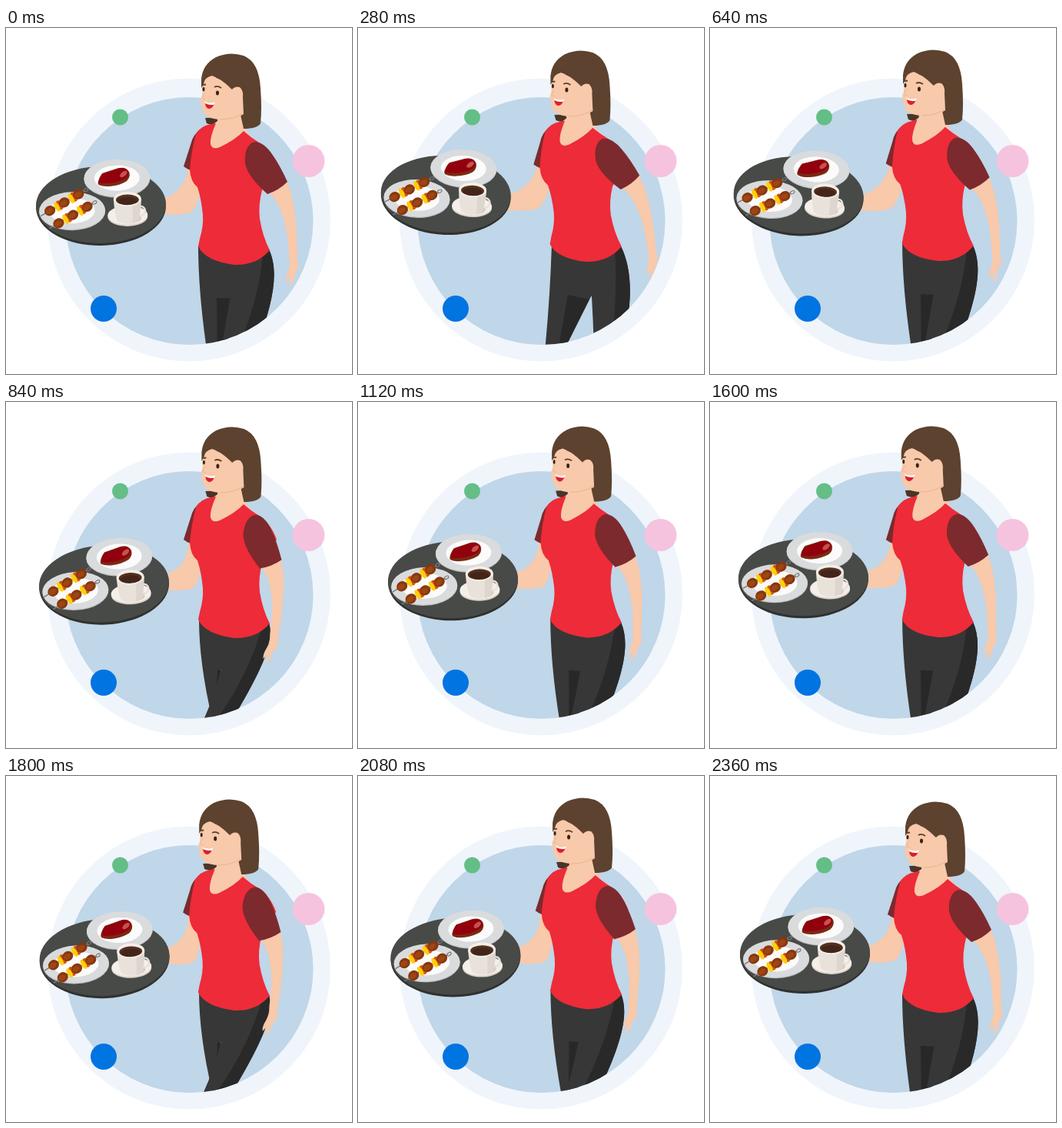
Animation of 450 by 450 pixels, one loop 2.4 s. Source, as an HTML page:

```html
<!DOCTYPE html>
<html lang="en">
<head>
<meta charset="utf-8">
<title>Waitress with tray</title>
<style>
html, body { margin: 0; width: 100%; height: 100%; overflow: hidden; background: #fff; }
svg { display: block; width: 100vw; height: 100vh; }
</style>
</head>
<body>
<svg viewBox="0 0 450 450">
  <defs>
    <clipPath id="stage"><path d="M0 0H450V251H399.5A161 161 0 0 1 77.5 251H0Z"/></clipPath>
  </defs>
  <circle cx="238" cy="249.5" r="184" fill="#eff5fb"/>
  <circle cx="238.5" cy="251" r="161" fill="#c0d6e9"/>
  <circle cx="148.5" cy="116" r="10.5" fill="#64be86"/>
  <circle cx="393.5" cy="173" r="21" fill="#f6c3df"/>
  <circle cx="127" cy="365" r="17" fill="#0074e0"/>

  <g clip-path="url(#stage)">
    <g id="backHair"><path d="M259 117L284 116L280 126Q268 127 261 124Z" fill="#4a3526"/></g>
    <path id="farArm" fill="#f8c9aa"/>
    <g id="legs">
      <path id="leftLeg" fill="#373737"/>
      <path id="shade" fill="#282828"/>
      <path id="rightLeg" fill="#373737"/>
      <path id="rightDark" fill="#292929"/>
    </g>
    <g id="torso">
      <path d="M254 131Q243 138 240 152L231 180Q239 186 250 188L262 150Z" fill="#7c2a2d"/>
      <path d="M276 112L275 121Q270 125 262 130L262 160H285L316 138Q311 133 310 126V100Z" fill="#f8c9aa"/>
      <path d="M267 125Q253 127 247 138Q241 160 239 184Q240 200 249 207Q254 222 256 243Q257 258 252 274L250 284Q259 303 297 308Q326 309 343 289Q334 272 330 248Q328 230 333 211L352 180Q344 158 329 149Q318 142 309 134Q299 145 278 155Q268 159 266 151Q265 142 273 124Q270 124 267 125Z" fill="#ee2b38"/>
      <g id="nearArm">
        <path d="M338 205L364 197Q373 216 376 243Q379 265 379 300Q381 307 380 313Q375 319 375 327Q372 335 368 336Q370 329 371 322Q367 328 365 331Q363 326 367 316Q370 308 368 298Q367 271 363 256Q356 226 342 214Z" fill="#f8c9aa"/>
        <path d="M323 148C313 151 310 163 311 176Q314 193 340 216Q355 211 366 200Q356 178 346 164Q335 148 323 148Z" fill="#7c2a2d"/>
      </g>
    </g>
    <g id="head">
      <path d="M254 66Q256 47 273 38Q291 30 309 36Q329 44 331 78Q333 105 331 124Q327 131 309 131L300 90L258 76Z" fill="#5c422f"/>
      <path d="M256 64Q265 58 274 65Q284 68 294 80Q298 75 304 77Q309 81 308 90L309 112Q297 120 282 119Q266 119 259 113Q255 107 254 100L253 92Q256 88 255 80Z" fill="#f8c9aa"/>
      <path d="M278 119Q297 119 309 110" fill="none" stroke="#e7b692" stroke-width="1"/>
      <path d="M254 67L260 58Q276 57 287 69L294 80Q279 65 268 62Q258 64 257 73L254 78Z" fill="#5c422f"/>
      <path d="M256 74L260 73.5M271 77Q275 74.5 280 78" fill="none" stroke="#5c422f" stroke-width="1.8"/>
      <ellipse cx="257" cy="79.5" rx="1.5" ry="2.8" fill="#3b2118"/>
      <ellipse cx="275" cy="84.5" rx="2" ry="3" fill="#3b2118"/>
      <path d="M259 84Q255 90 256 92L260 93" fill="none" stroke="#edb990" stroke-width="1"/>
      <path d="M258 95.500Q265 99 272 96.500Q270 102 266 103Q261 102 258 95.500Z" fill="#fff"/>
      <path d="M259 98Q265 101 270.500 99.500Q268 105 263.500 105Q259.500 103.500 259 98Z" fill="#df1d2b"/>
    </g>
  </g>

  <g id="tray">
    <ellipse cx="123.500" cy="232.500" rx="84.500" ry="50.500" fill="#30312f"/>
    <ellipse cx="123.500" cy="230" rx="84.500" ry="50" fill="#484a47"/>
    <g id="plates"></g>
    <path d="M120 202Q121 195 126 189Q136 186 146 183Q157 180 161 188Q163 195 157 200Q148 205 137 206Q127 207 121 204Z" fill="#7a2a12"/>
    <path d="M121 201Q122 194 127 189Q138 187 147 183Q158 181 160 189Q160 195 152 198Q143 202 133 202Q126 203 121 201Z" fill="#93000d"/>
    <ellipse cx="153.500" cy="190.500" rx="5.500" ry="3" fill="#c4534e" transform="rotate(-38 153.500 190.500)"/>
    <g id="skewers"></g>
    <ellipse cx="158" cy="246" rx="26" ry="12.500" fill="#d9d2c8"/>
    <ellipse cx="158" cy="244" rx="26" ry="12.500" fill="#f4efe8"/>
    <ellipse cx="160" cy="248" rx="16" ry="7" fill="#d8d0c6"/>
    <ellipse cx="175.500" cy="239" rx="5.500" ry="6" fill="none" stroke="#e8e2da" stroke-width="2.500"/>
    <path d="M140 223Q141 244 145 252Q158 259 171 252Q175 243 176 223Z" fill="#e9e2db"/>
    <path d="M165 230L176 223Q175 243 171 252Q168 254 164 255Z" fill="#ded6ce"/>
    <ellipse cx="158" cy="223" rx="18" ry="9.500" fill="#f4efe9"/>
    <ellipse cx="158" cy="224" rx="15" ry="6.800" fill="#54301f"/>
    <ellipse cx="158" cy="225.500" rx="12.500" ry="5" fill="#43251a"/>
  </g>
</svg>
<script>
const LOOP = 2400;
const $ = id => document.getElementById(id);

// Static tray items
const disc = (x, y, rx, ry, fill) => `<ellipse cx="${x}" cy="${y}" rx="${rx}" ry="${ry}" fill="${fill}"/>`;
const plate = (x, y) => disc(x, y + 1, 43, 24.5, '#bfc0c2') + disc(x, y, 43, 24.3, '#dadbdd') + disc(x, y, 29.5, 16.5, '#fbfbfb');

function skewer(x, y) {
  const bit = (d, rx, ry, fill) => disc(d, 0, rx, ry, fill);
  let s = '<path d="M-14 0H52" stroke="#77797c" stroke-width="1.4"/>' +
    '<ellipse cx="54" cy="0" rx="3" ry="1.800" fill="none" stroke="#77797c" stroke-width="1.100"/>';
  for (let i = 0; i < 3; i++) {
    const d = i * 21.5;
    if (i) s += bit(d - 7, 4.5, 6.5, '#d9540f') + bit(d - 11, 3, 6.8, '#ffcf08');
    s += bit(d, 7.3, 6.4, '#87370f') + bit(d - 1, 5, 3.5, '#9c4614');
  }
  return `<g transform="translate(${x} ${y}) rotate(-29)">${s}</g>`;
}
$('plates').innerHTML = plate(86, 237) + plate(145, 195.5);
$('skewers').innerHTML = skewer(57, 236.5) + skewer(68, 253);

// Smooth periodic track through [time, value] keys, flat at the extremes
function track(...keys) {
  const n = keys.length;
  const key = i => {
    const lap = Math.floor(i / n), k = keys[i - lap * n];
    return [k[0] + lap * LOOP, k[1]];
  };
  const slope = i => {
    const a = key(i), b = key(i + 1);
    return (b[1] - a[1]) / (b[0] - a[0]);
  };
  const tangent = i => {
    const a = slope(i - 1), b = slope(i);
    return a * b <= 0 ? 0 : 2 * a * b / (a + b);
  };
  return t => {
    let i = n - 1;
    while (i > 0 && keys[i][0] > t) i--;
    const a = key(i), b = key(i + 1), h = b[0] - a[0], u = (t - a[0]) / h;
    const v = 1 - u;
    return a[1] * (1 + 2 * u) * v * v + b[1] * u * u * (3 - 2 * u) +
      h * u * v * (tangent(i) * v - tangent(i + 1) * u);
  };
}

const trayX = track([0, 0], [280, -9.2], [470, -12.5], [640, -8.3], [840, 4], [950, 5.5], [1360, -9], [1400, -8.6], [1800, 4.6], [1880, 5.5], [2360, 0]);
const trayY = track([0, 0], [280, -14], [470, -16], [640, -12.7], [840, 6.5], [950, 8], [1360, -10], [1400, -9.5], [1800, 6], [1880, 7], [2360, 0]);
const trayTurn = track([0, -1], [280, 2.5], [470, 3.5], [640, 2.8], [840, -2.8], [950, -3.2], [1400, 1.3], [1800, -2.8], [1880, -3], [2360, -1]);
const bob = track([0, 0], [280, -4], [480, -5.6], [640, -5], [840, -1], [960, 0], [1340, -4.2], [1400, -4], [1600, -2], [1800, -3], [2000, -5.6], [2360, 0]);
const headX = track([0, 0], [280, -3.6], [480, -4.2], [640, -3], [840, 0.4], [930, 1], [1400, -7], [1800, -2.8], [2360, 0]);
const lean = track([0, 0], [280, -1.3], [480, -1.5], [640, -1.1], [840, 0], [1400, -1.5], [1800, -0.4], [2360, 0]);
const swing = track([0, 0], [280, -5], [430, -7], [640, -0.5], [840, 10], [920, 11], [1380, -7], [1400, -6.8], [1800, 10], [1880, 10.5], [2360, 0]);
const stride = track([0, 0.45], [280, 1], [400, 1.06], [640, 0.43], [840, 0], [900, -0.02], [1380, 0.86], [1400, 0.85], [1800, 0], [1860, -0.02], [2240, 0.45]);

// Leg outlines: crossed, passing, wide
const crossed = [251,283, 251,345, 271,425, 275,349, 272,425, 279,350, 285,425, 279,351, 270,388, 252,425, 288,425, 330,355, 350,315, 315,360, 266,425];
const passing = [250,283, 250,345, 262,425, 274,351, 275,425, 300,352, 285,425, 291,354, 285,388, 279,425, 322,425, 345,365, 357,320, 331,350, 298,425];
const wide = [252,284, 250,352, 243,425, 273,351, 260,425, 301,357, 267,425, 304,354, 306,388, 307,425, 340,425, 358,370, 358,320, 338,350, 329,425];

function drawLegs(s) {
  const [a, b, u] = s < 0.45 ? [crossed, passing, s / 0.45] : [passing, wide, (s - 0.45) / 0.55];
  const p = [];
  for (let i = 0; i < a.length; i += 2) {
    p.push([0, 1].map(j => (a[i + j] + (b[i + j] - a[i + j]) * u).toFixed(2)).join(' '));
  }
  const outer = `C${p[11]} ${p[12]} 342 288`;
  $('leftLeg').setAttribute('d', `M${p[0]}Q${p[1]} ${p[2]}L${p[6]}L${p[5]}L342 288Z`);
  $('shade').setAttribute('d', `M${p[3]}L${p[5]}L${p[6]}L${p[4]}Z`);
  $('rightLeg').setAttribute('d', `M300 285L${p[7]}Q${p[8]} ${p[9]}L${p[10]}${outer}Z`);
  $('rightDark').setAttribute('d', `M334 290Q${p[13]} ${p[14]}L${p[10]}${outer}Z`);
}

const pose = (id, value) => $(id).setAttribute('transform', value);

function draw(t) {
  const x = trayX(t), y = trayY(t), up = bob(t), tilt = lean(t), hx = headX(t);
  pose('tray', `translate(${x} ${y}) rotate(${trayTurn(t)} 123.5 231)`);
  pose('head', `translate(${hx} ${up})`);
  pose('backHair', `translate(${hx} ${up})`);
  pose('torso', `translate(0 ${up}) rotate(${tilt} 300 300)`);
  pose('legs', `translate(0 ${up})`);
  pose('nearArm', `rotate(${swing(t) - tilt} 327 160)`);
  drawLegs(stride(t));

  // The far arm joins the sleeve to the tray
  const sx = tilt * 2.2, ex = x * 0.6, ey = y * 0.4;
  const wx = 203 + x, wy = 222 + y * 0.35;
  $('farArm').setAttribute('d',
    `M${238 + sx} ${178 + up}C${235 + ex} ${198 + ey} ${227 + ex} ${216 + ey} ${wx} ${wy}` +
    `L${wx} ${wy + 20}Q${229 + ex} ${244 + ey} ${240 + ex} ${240 + ey}` +
    `Q${250 + ex} ${233 + ey} ${254 + sx} ${203 + up}L252 ${178 + up}Z`);
}

const start = performance.now();
function tick() {
  draw((performance.now() - start) % LOOP);
  requestAnimationFrame(tick);
}
draw(0);
requestAnimationFrame(tick);
</script>
</body>
</html>
```
